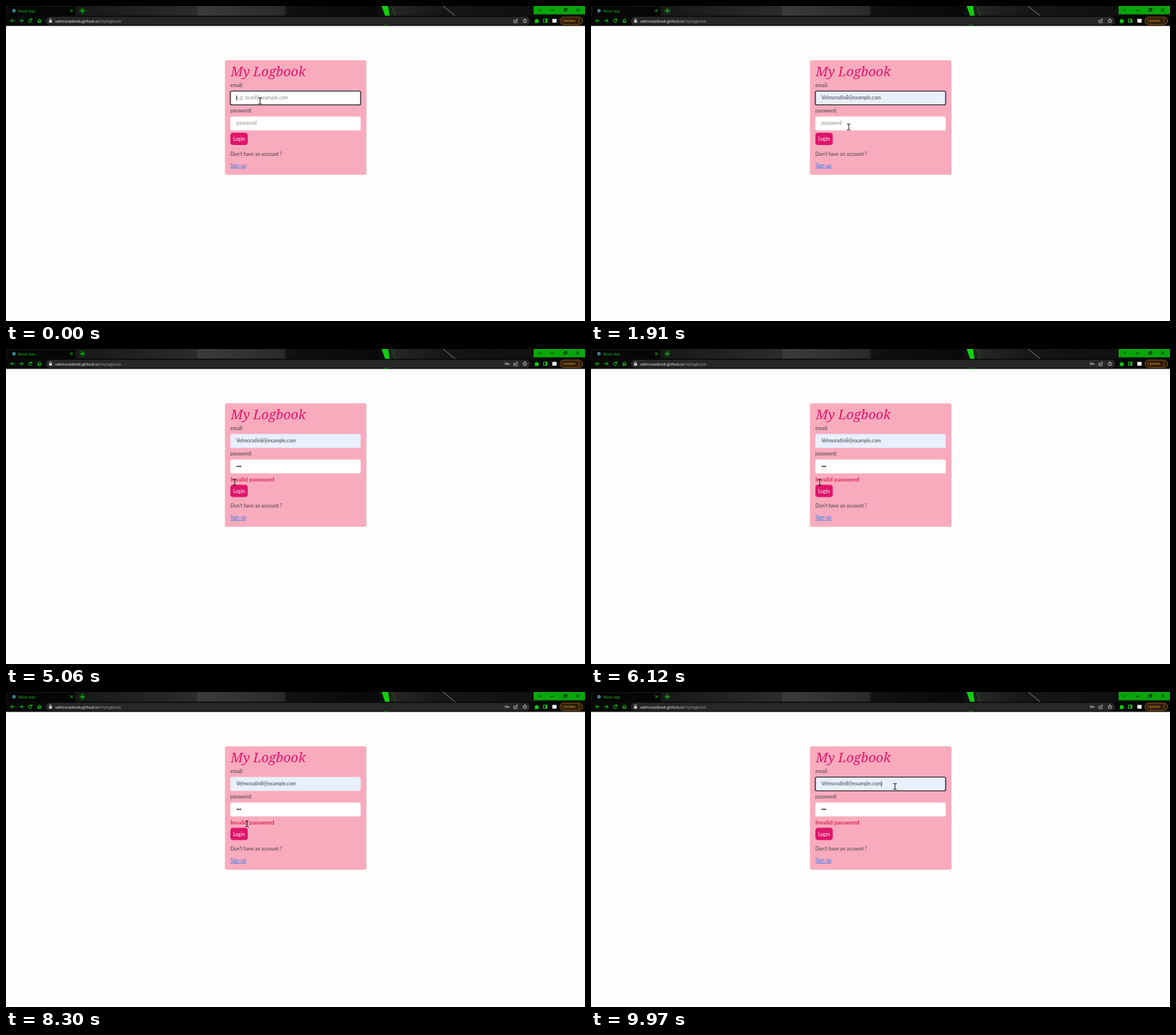
An HTML page that plays this animation: 800x435 px, repeating every 10 s.

```html
<!DOCTYPE html>
<html lang="en">
<head>
<meta charset="utf-8">
<title>Login form</title>
<style>
  html, body { margin: 0; width: 100%; height: 100%; overflow: hidden; background: #fefefe; }
  svg { display: block; width: 100%; height: 100%; }
  text { font: 6.8px Lato, sans-serif; fill: #3f3f49; }
  .bar { font: 5.6px "Open Sans", sans-serif; }
  .title { font: italic 18px "Noto Serif", serif; fill: #e0156b; }
  .hint { fill: #858990; }
  .error { font-size: 8.3px; font-weight: 500; fill: #d20a3c; }
  .line { fill: none; stroke-width: 1; stroke-linecap: round; stroke-linejoin: round; }
  .green { stroke: #12c912; }
  .grey { stroke: #c6c6c6; stroke-width: .8; }
</style>
</head>
<body>
<svg viewBox="0 0 800 435" preserveAspectRatio="none">
  <defs>
    <linearGradient id="theme">
      <stop offset="0" stop-color="#101110"/>
      <stop offset=".15" stop-color="#191a19"/>
      <stop offset=".33" stop-color="#2b2c2b"/>
      <stop offset=".331" stop-color="#3a3b3a"/>
      <stop offset=".48" stop-color="#292a29"/>
      <stop offset=".485" stop-color="#101110"/>
      <stop offset=".64" stop-color="#080908"/>
      <stop offset=".67" stop-color="#252725"/>
      <stop offset=".76" stop-color="#151615"/>
      <stop offset="1" stop-color="#0b0c0b"/>
    </linearGradient>
  </defs>
  <rect width="800" height="435" fill="#fefefe"/>

  <!-- Browser tabs -->
  <rect width="800" height="14" fill="url(#theme)"/>
  <path d="M519 0h9l2 14h-6z" fill="#10d010"/>
  <path d="M533 0l5 14" class="line" stroke="#175f17"/>
  <path d="M604 0l17 14" class="line" stroke="#858585" stroke-width=".7"/>
  <path d="M2 14V3q0-2 2-2h90q2 0 2 2v11z" fill="#050605"/>
  <circle cx="11" cy="6.5" r="2.5" fill="#3c7f92"/>
  <text class="bar" x="17" y="8.6" style="fill:#16c916;font-size:5px">React App</text>
  <path class="line green" d="M89 5l3 3m0-3l-3 3"/>
  <circle cx="105.5" cy="6.5" r="4.8" fill="#123612"/>
  <path class="line green" d="M103 6.5h5m-2.500-2.500v5"/>
  <rect x="729" width="71" height="11.500" fill="#08a50b"/>
  <path class="line" stroke="#062d06" stroke-width=".8" d="M736 5l1.500 1.500L739 5m14 1h4m14-1.500h3v3h-3zm1 0v-1h3v3h-1m14-3l4 4m0-4l-4 4"/>

  <!-- Toolbar -->
  <rect y="13.500" width="800" height="14" fill="#080908"/>
  <path d="M522 26.500h6l1 1h-6z" fill="#0fae0f"/>
  <rect x="55" y="15" width="669" height="11" rx="5.500" fill="#262726"/>
  <g class="line green">
    <path d="M11.500 20.300h-5l2.200-2.200m-2.200 2.200l2.200 2.200M18.500 20.300h5l-2.200-2.200m2.200 2.200l-2.200 2.200"/>
    <path d="M35.500 19a2.400 2.400 0 1 0 .2 2.300M35.800 17.500v2h-2M43.500 20.300l2.700-2.500 2.700 2.500M44.400 20v2.800h1.200v-1.500h1.200v1.500H48V20"/>
  </g>
  <rect x="59.500" y="19.500" width="4" height="3.500" rx=".5" fill="#d0d0d0"/>
  <path class="line grey" d="M60.300 19.500v-1a1.200 1.200 0 0 1 2.400 0v1"/>
  <text class="bar" x="68" y="22.500" style="fill:#f0f0f0">velmoradinek.github.io<tspan fill="#a4a4a4">/mylogbook</tspan></text>
  <g id="key" class="line grey">
    <circle cx="691" cy="20.300" r="1.500"/>
    <path d="M692.500 20.300h2.700v1.300m-1.300-1.300v1"/>
  </g>
  <path class="line grey" d="M703 19.500h-1.200v3.500h4.700v-1M703.500 21.500q.3-2.600 3.200-2.600m-1.300-1.500l1.500 1.500-1.500 1.500"/>
  <path class="line grey" d="M717 17.500l.9 1.900 2 .2-1.500 1.400.4 2-1.800-1-1.800 1 .4-2-1.500-1.400 2-.2z"/>
  <path d="M730.500 18.800h1.600a1 1 0 0 1 2 0h1.500v1.500a1 1 0 0 1 0 2v1.200h-5.100v-1.500a.9.900 0 0 0 0-1.700z" fill="#12c912"/>
  <rect class="line green" x="743" y="18" width="4.500" height="4.600"/>
  <rect x="745.500" y="18" width="2" height="4.600" fill="#12c912"/>
  <rect x="754.800" y="17.800" width="6" height="5.200" rx=".7" fill="#ececec"/>
  <rect x="765.500" y="15.300" width="31" height="10.200" rx="5.100" fill="#2b1d0c" stroke="#a96316" stroke-width=".8"/>
  <text class="bar" x="769" y="22.300" style="fill:#ee951f;font-size:5.200px">Update</text>
  <path d="M791.500 17.800v.1m0 2.400v.1m0 2.400v.1" class="line" stroke="#ee951f"/>

  <!-- Form -->
  <rect id="card" x="302.500" y="75" width="195.500" height="158" rx="2.500" fill="#f9abbe"/>
  <text class="title" x="310.500" y="97">My Logbook</text>
  <text x="310" y="111.500">email:</text>
  <rect id="mailBox" x="310" y="117.500" width="180" height="19" rx="2"/>
  <text id="mail" x="318.200" y="129.200"></text>
  <text x="310" y="147">password:</text>
  <rect id="passBox" x="310" y="152.700" width="180" height="19" rx="2" fill="#fff"/>
  <text id="passHint" class="hint" x="318.200" y="164.400">password</text>
  <g id="dots" fill="#222"></g>
  <rect id="caret" width=".7" height="7.500" fill="#111"/>
  <text id="error" class="error" x="310" y="182.700">Invalid password</text>
  <g id="lower">
    <rect x="310" y="175" width="24" height="17" rx="4" fill="#e0156b"/>
    <text x="314" y="186.200" style="fill:#fff">Login</text>
    <text x="310" y="207">Don't have an account ?</text>
    <text x="310" y="222.700" style="fill:#2878ee;text-decoration:underline">Sign up</text>
  </g>

  <!-- Pointer -->
  <g id="pointer">
    <path id="beam" class="line" stroke="#222" stroke-width=".9" d="M-2-4h1.300q.7 0 .7.700v6.600q0 .7-.7.700H-2M2-4H.700Q0-4 0-3.300M2 4H.700Q0 4 0 3.300"/>
    <path id="arrow" fill="#fff" stroke="#222" stroke-width=".6" d="M0 0v7l1.600-1.500 1.100 2.500 1.200-.5-1.100-2.400H5z"/>
  </g>
</svg>
<script>
const $ = id => document.getElementById(id);
const LOOP = 10000;
const FILL = 1200, TO_PASS = 1960, SUBMIT = 4850, ERROR = 5050, BACK = 9500;
const KEYS = [3450, 3800, 4150];
const MAIL = "Velmoradin8@example.com";
const SHIFT = 12.4;

// Pointer stops: time, x, y
const PATH = [
  [0, 351, 131], [500, 351, 131], [950, 350, 146], [1250, 350, 146],
  [1800, 356, 167], [4250, 356, 167], [4700, 316, 184], [6250, 316, 184],
  [6750, 350, 181], [7300, 375, 174.5], [7600, 375, 174.5],
  [8200, 333, 182], [8600, 333, 182], [9350, 420, 130.5], [LOOP, 420, 130.5]
];

$("dots").innerHTML = KEYS.map((_, i) =>
  `<circle cx="${319.5 + i * 2.2}" cy="162" r=".95"/>`).join("");
const dots = [...$("dots").children];

const show = (id, on) => $(id).setAttribute("visibility", on ? "visible" : "hidden");
const inside = (x, y, l, t, r, b) => x >= l && x <= r && y >= t && y <= b;

function pointerAt(t) {
  const i = Math.max(1, PATH.findIndex(p => p[0] > t));
  const [t0, x0, y0] = PATH[i - 1], [t1, x1, y1] = PATH[i];
  const u = (t - t0) / (t1 - t0), e = u * u * (3 - 2 * u);
  return [x0 + (x1 - x0) * e, y0 + (y1 - y0) * e];
}

function outline(id, focused) {
  $(id).setAttribute("stroke", focused ? "#151515" : "#f3dbe2");
  $(id).setAttribute("stroke-width", focused ? 1.2 : .4);
}

function draw(t) {
  const filled = t >= FILL, failed = t >= ERROR;
  const onMail = t < TO_PASS || t >= BACK;
  const onPass = t >= TO_PASS && t < SUBMIT;
  const typed = KEYS.filter(k => t >= k).length;

  $("mail").textContent = filled ? MAIL : "e.g. tovel@example.com";
  $("mail").setAttribute("class", filled ? "" : "hint");
  $("mailBox").setAttribute("fill", filled ? "#e8f0fe" : "#fff");
  outline("mailBox", onMail);
  outline("passBox", onPass);
  show("passHint", !typed);
  show("key", typed);
  dots.forEach((d, i) => d.setAttribute("visibility", i < typed ? "visible" : "hidden"));

  show("error", failed);
  $("card").setAttribute("height", 158 + (failed ? SHIFT : 0));
  $("lower").setAttribute("transform", `translate(0 ${failed ? SHIFT : 0})`);

  const since = Math.max(...[0, FILL, TO_PASS, ...KEYS, BACK].filter(s => s <= t));
  const mailEnd = filled ? $("mail").getComputedTextLength() : 0;
  $("caret").setAttribute("x", 318.3 + (onMail ? mailEnd : typed * 2.2));
  $("caret").setAttribute("y", onMail ? 123.2 : 158.4);
  show("caret", (onMail || onPass) && Math.floor((t - since) / 500) % 2 === 0);

  const [x, y] = pointerAt(t);
  const overText = inside(x, y, 310, 117, 490, 137) || inside(x, y, 310, 152, 490, 172) ||
    (failed && inside(x, y, 310, 175, 372, 186));
  $("pointer").setAttribute("transform", `translate(${x} ${y})`);
  show("beam", overText);
  show("arrow", !overText);
}

const start = performance.now();
function tick() {
  draw((performance.now() - start) % LOOP);
  requestAnimationFrame(tick);
}
tick();
</script>
</body>
</html>
```
